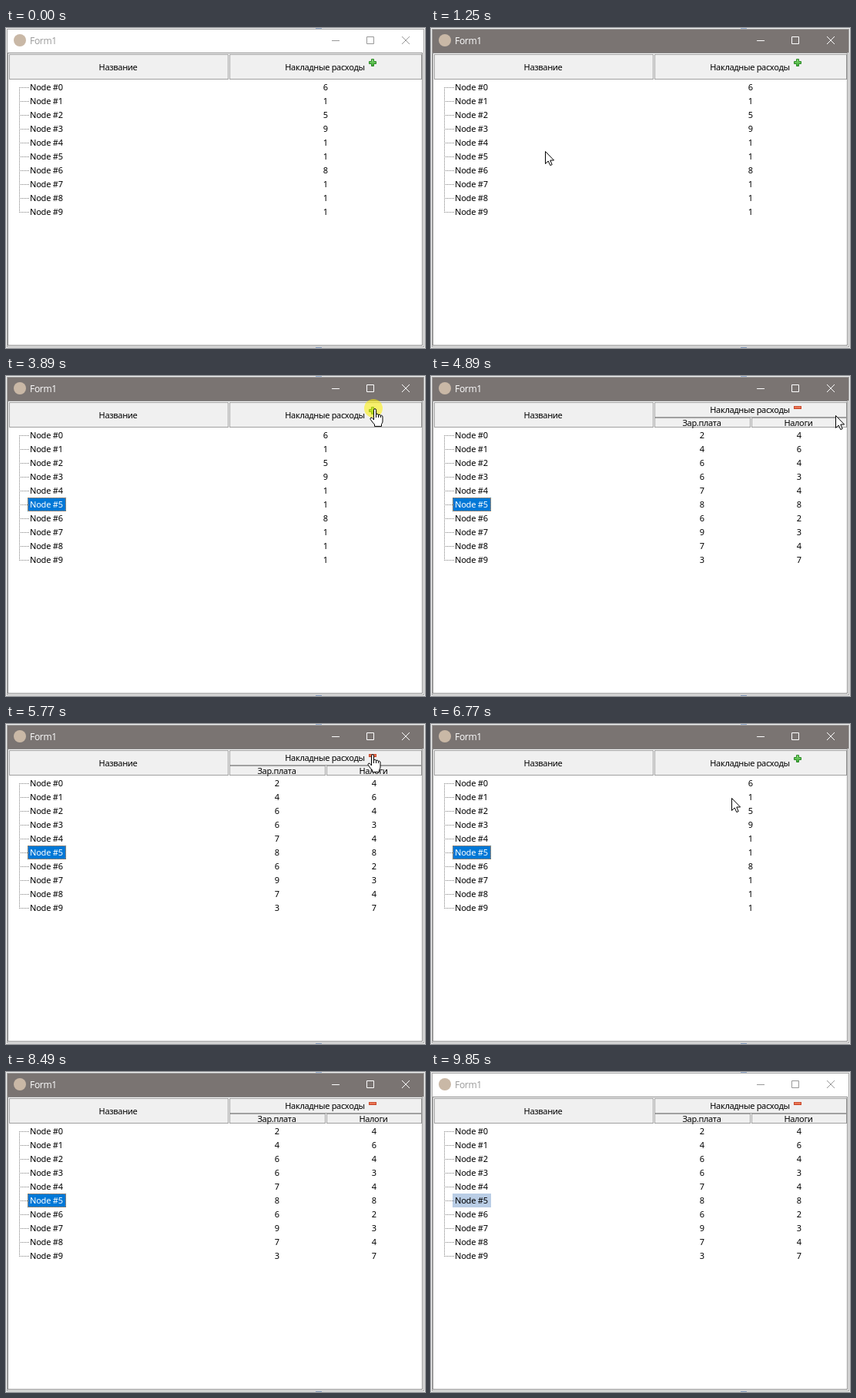
These frames come from a looping animation (544 px wide and 416 px high, 9930 ms). An HTML page:

```html
<!DOCTYPE html>
<html lang="ru">
<head>
<meta charset="utf-8">
<title>Form1</title>
<style>
html, body { margin: 0; width: 100%; height: 100%; overflow: hidden; background: #fff; }
svg { display: block; width: 544px; height: 416px; }
text { font: 11px "Noto Sans", "Open Sans", sans-serif; letter-spacing: -.2px; fill: #000; }
.head text { letter-spacing: -.33px; text-anchor: middle; }
.num { text-anchor: middle; letter-spacing: 0; }
#title { font: 12px "Open Sans", "Noto Sans", sans-serif; letter-spacing: -.3px; }
rect, .dots { shape-rendering: crispEdges; }
.dots { stroke: #808080; stroke-dasharray: 1 1; fill: none; }
</style>
</head>
<body>
<svg viewBox="0 0 544 416" xmlns="http://www.w3.org/2000/svg">
  <defs>
    <linearGradient id="green" x2="0" y2="1"><stop stop-color="#8fe07c"/><stop offset="1" stop-color="#35a52c"/></linearGradient>
    <linearGradient id="red" x2="0" y2="1"><stop stop-color="#f9a77d"/><stop offset="1" stop-color="#d9442a"/></linearGradient>
  </defs>
  <rect width="544" height="416" fill="#f1f1f1"/>
  <rect x="402" width="8" height="416" fill="#9db4d6"/>
  <rect x="1" y="1" width="542" height="414" fill="#a5a5a5"/>
  <rect x="2" y="2" width="540" height="412" fill="#fff"/>
  <rect id="bar" x="2" y="2" width="540" height="30"/>
  <circle cx="18" cy="16" r="8" fill="#c9b8a6"/>
  <text id="title" x="31" y="21">Form1</text>
  <path id="buttons" fill="none" d="M423 16.5H433M468.5 11.5H477.5V20.5H468.5ZM514 11L524 21M524 11L514 21"/>
  <rect x="2.5" y="32.5" width="538" height="380" fill="#fff" stroke="#8a8a8a"/>
  <g class="head" id="name"></g>
  <g class="head" id="closed"></g>
  <g class="head" id="open"></g>
  <rect id="sel" x="28" width="50" height="18"/>
  <rect id="focus" x="28.5" width="49" height="17" fill="none" stroke="#ff8728" stroke-dasharray="1 1" stroke-dashoffset=".5"/>
  <g id="rows"></g>
  <circle id="click" r="12" fill="#fff000" fill-opacity=".55"/>
  <g id="mouse" stroke="#000" fill="#fff" stroke-linejoin="round">
    <path id="arrow" d="M.5 .5V16.5L4.2 13 6.8 18.6 9.2 17.6 6.8 12H11.6Z"/>
    <path id="hand" d="M.5 15V2.2Q.5 .6 2 .6T3.5 2.2V8.5Q3.7 7.2 5.1 7.3T6.5 9Q6.8 7.9 8 8.1T9.4 9.8Q9.8 8.8 10.8 9.2T12 11V17Q12 19 10.5 20.5V23.4H1.5V21Q-1.2 18.4-3.7 14.5Q-4.7 12.8-3.2 12.2T-.7 13.5Z M3.5 8V12M6.5 9V12M9.4 10V12"/>
  </g>
</svg>
<script>
const LOOP = 9930, STEP = 40;
const $ = id => document.getElementById(id);

function add(parent, tag, attrs, label) {
  const el = document.createElementNS("http://www.w3.org/2000/svg", tag);
  for (const k in attrs) el.setAttribute(k, attrs[k]);
  if (label !== undefined) el.textContent = label;
  return parent.appendChild(el);
}

function cell(g, x, y, width, height, label) {
  add(g, "rect", { x: x + .5, y: y + .5, width: width - 1, height: height - 1, fill: "#f0f0f0", stroke: "#a0a0a0" });
  add(g, "text", { x: x + width / 2 - 1, y: y + height / 2 + 4 }, label);
}

// header
cell($("name"), 4, 34, 285, 33, "Название");
cell($("closed"), 290, 34, 250, 33, "Накладные расходы");
add($("closed"), "path", { d: "M474.5 40.5h3v3h3v3h-3v3h-3v-3h-3v-3h3z", fill: "url(#green)", stroke: "#2f8a2a" });
cell($("open"), 290, 34, 250, 20, "Накладные расходы");
cell($("open"), 290, 54, 125, 13, "Зар.плата");
cell($("open"), 416, 54, 124, 13, "Налоги");
add($("open"), "rect", { x: 471.5, y: 39.5, width: 9, height: 3, fill: "url(#red)", stroke: "#c9492e" });

// tree
const totals = "6159118111", wages = "2466786973", taxes = "4643482347";
add($("rows"), "path", { class: "dots", d: "M17.5 77V240" });
const rows = [...totals].map((total, i) => {
  const g = $("rows"), y = 81 + 18 * i;
  const num = (x, v) => add(g, "text", { x, y, class: "num" }, v);
  add(g, "path", { class: "dots", d: `M19 ${y - 3.5}H30` });
  return {
    name: add(g, "text", { x: 31, y }, "Node #" + i),
    total: num(415, total),
    parts: [num(352, wages[i]), num(478, taxes[i])]
  };
});

// pointer moves: start, end, x, y; it rests in between
const moves = [
  [490, 1250, 148, 160], [1290, 1890, 52, 115], [2090, 2410, 50, 150], [2490, 2650, 52, 168],
  [2690, 3050, 437, 173], [3050, 3330, 481, 49], [3450, 3890, 477, 42], [4370, 4610, 494, 70],
  [4810, 4890, 525, 51], [5010, 5690, 474, 39], [6450, 6900, 369, 110], [6900, 7530, 478, 43],
  [7850, 7890, 485, 43], [8090, 8490, 501, 418]
];
// a press on a row selects it at once; on the header it toggles the columns on release
const clicks = [
  { down: 1890, up: 1970, row: 2 }, { down: 2410, up: 2490, row: 4 }, { down: 2650, up: 2730, row: 5 },
  { down: 3890, up: 4050 }, { down: 6050, up: 6210 }, { down: 7850, up: 7890 }
];
const isRow = c => c.row !== undefined;
const ease = k => k * k * (3 - 2 * k);

function pointer(t) {
  let x = 500, y = 430;
  for (const [a, b, x1, y1] of moves) {
    if (t <= a) break;
    const k = ease(Math.min(1, (t - a) / (b - a)));
    x += (x1 - x) * k;
    y += (y1 - y) * k;
  }
  return [Math.round(x), Math.round(y)];
}
const show = (el, on) => el.setAttribute("visibility", on ? "visible" : "hidden");

function draw(t) {
  const active = t >= 490 && t < 9850;
  const open = clicks.filter(c => !isRow(c) && t >= c.up).length % 2 === 1;
  const sel = clicks.findLast(c => isRow(c) && t >= c.down)?.row ?? -1;
  const editing = t < 3130;

  $("bar").setAttribute("fill", active ? "#7a7472" : "#fff");
  $("title").style.fill = active ? "#fff" : "#999";
  $("buttons").setAttribute("stroke", active ? "#fff" : "#999");
  show($("closed"), !open);
  show($("open"), open);

  show($("sel"), sel >= 0);
  show($("focus"), sel >= 0 && active);
  $("sel").setAttribute("y", 68 + 18 * sel);
  $("focus").setAttribute("y", 68.5 + 18 * sel);
  $("sel").setAttribute("fill", active ? "#0078d7" : "#b9cde5");
  rows.forEach((row, i) => {
    row.name.style.fill = active && i === sel ? "#fff" : "#000";
    show(row.total, !open && !(editing && i === sel));
    row.parts.forEach(p => show(p, open));
  });

  const [x, y] = pointer(t);
  const hand = x >= 470 && x < 481 && y >= 39 && y <= (open ? 44 : 50);
  const place = `translate(${x} ${y})`;
  $("mouse").setAttribute("transform", place);
  $("click").setAttribute("transform", place);
  show($("hand"), hand);
  show($("arrow"), !hand);
  show($("click"), clicks.some(c => t >= c.down && t < c.up));
}

const start = performance.now();
function tick() {
  const t = (performance.now() - start) % LOOP;
  draw(Math.floor((t - 10) / STEP) * STEP + 10);
  requestAnimationFrame(tick);
}
tick();
</script>
</body>
</html>
```
